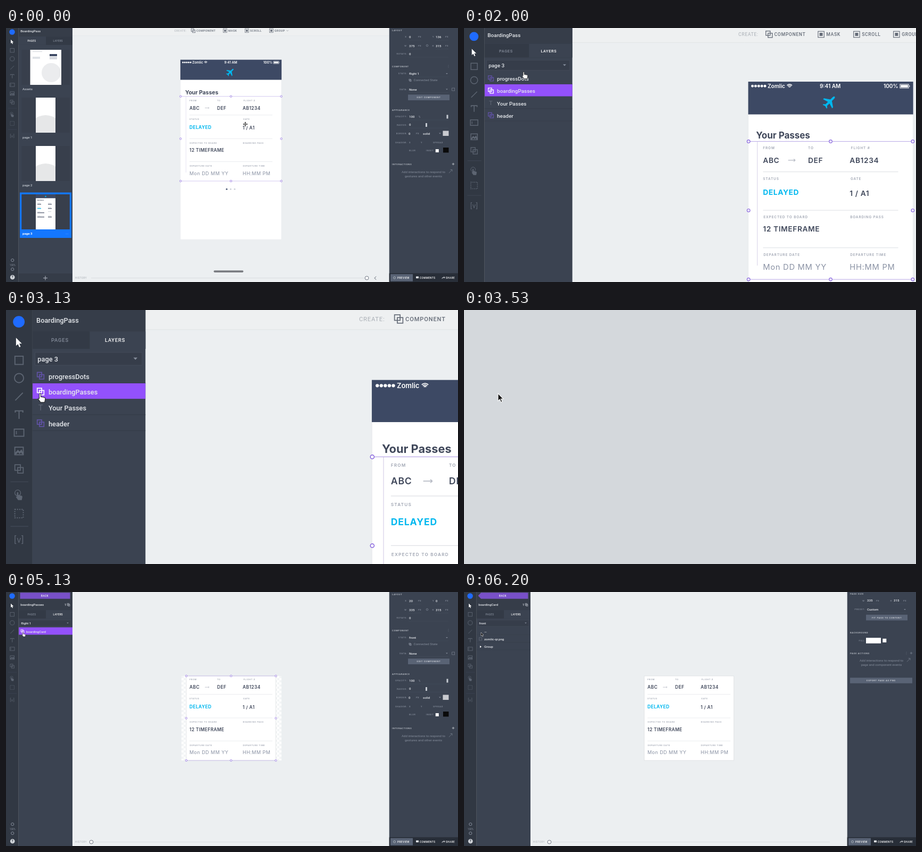
An HTML page with a canvas that plays this animation: 850 px wide and 478 px high, repeating every 7.67 s.

```html
<!DOCTYPE html>
<html lang="en">
<head>
<meta charset="utf-8">
<title>Design editor walkthrough</title>
<style>
html, body { margin: 0; width: 100%; height: 100%; overflow: hidden; background: #eceff1; }
canvas { display: block; width: 850px; height: 478px; }
</style>
</head>
<body>
<canvas id="stage" width="850" height="478"></canvas>
<script>
const c = document.getElementById('stage').getContext('2d');
const LOOP = 7670, UI = 'Roboto, sans-serif', PASS = 'Inter, sans-serif';
const PANEL = '#3b4351', DARK = '#313843', DIM = '#858d9b', LIGHT = '#e4e7eb', PURPLE = '#9351fc';
const ARROW = new Path2D('M0 0V6.7L1.6 5.3L2.7 7.9L3.8 7.4L2.7 4.9H4.8Z');
const HAND = new Path2D('M1 .8Q1 0 1.7 0T2.4 .8V3L5.6 3.6Q6.6 3.9 6.4 5L5.8 8H2.2L0 4.9Q.3 4 1 4.6Z');
const PLANE = new Path2D('M0-8Q1.2-8 1.2-5.5V-2.5L7 1.5V3L1.2 1.2V5L3 6.5V7.5L0 6.6L-3 7.5V6.5L-1.2 5V1.2L-7 3V1.5L-1.2-2.5V-5.5Q-1.2-8 0-8Z');

const ease = (t, a, b) => {
  const p = Math.min(1, Math.max(0, (t - a) / (b - a)));
  return p * p * (3 - 2 * p);
};

function box(x, y, w, h, fill, stroke, lw = .6) {
  if (fill) { c.fillStyle = fill; c.fillRect(x, y, w, h); }
  if (stroke) { c.strokeStyle = stroke; c.lineWidth = lw; c.strokeRect(x, y, w, h); }
}

function dot(x, y, r, fill, stroke, lw = .7) {
  c.beginPath();
  c.arc(x, y, r, 0, 7);
  if (fill) { c.fillStyle = fill; c.fill(); }
  if (stroke) { c.strokeStyle = stroke; c.lineWidth = lw; c.stroke(); }
}

function line(color, lw, ...p) {
  c.beginPath();
  for (let i = 0; i < p.length; i += 2) c.lineTo(p[i], p[i + 1]);
  c.strokeStyle = color;
  c.lineWidth = lw;
  c.stroke();
}

function shape(path, x, y, fill, stroke, scale = 1, turn = 0) {
  c.save();
  c.translate(x, y);
  c.rotate(turn);
  c.scale(scale, scale);
  c.fillStyle = fill;
  c.fill(path);
  if (stroke) { c.strokeStyle = stroke; c.lineWidth = .5; c.stroke(path); }
  c.restore();
}

// y is the middle of the capitals
function text(s, x, y, size = 6.1, color = LIGHT, weight = 500, gap = 0, align = 'left', font = UI) {
  c.font = `${weight} ${size}px ${font}`;
  c.letterSpacing = gap + 'px';
  c.textAlign = align;
  c.fillStyle = color;
  c.fillText(s, x, y + size * .36);
}

const caps = (s, x, y, color = '#c3c8d0', align = 'left', size = 4.3) =>
  text(s, x, y, size, color, 500, .6, align);
const caret = (x, y, color = DIM) => {
  c.beginPath();
  c.moveTo(x - 1.8, y - 1);
  c.lineTo(x + 1.8, y - 1);
  c.lineTo(x, y + 1);
  c.fillStyle = color;
  c.fill();
};
const plus = (x, y, r, color = DIM, w = .7) => {
  line(color, w, x - r, y, x + r, y);
  line(color, w, x, y - r, x, y + r);
};
const component = (x, y, color, s = 1) => {
  box(x - 3 * s, y - 3 * s, 4 * s, 4 * s, null, color, .8);
  box(x - s, y - s, 4 * s, 4 * s, null, color, .8);
};
const button = (x, y, w, h, s) => {
  box(x, y, w, h, '#596375');
  caps(s, x + w / 2, y + h / 2, '#d5d9df', 'center');
};

function toolbar() {
  box(0, -5, 23.8, 490, DARK);
  dot(11.5, 7.5, 5.2, '#1f6bff');
  shape(ARROW, 9, 21.8, '#fff', null, 1.08);
  const g = '#5d6572', x = 11.7;
  box(x - 3.7, 38.4, 7.4, 7.4, null, g, .9);
  dot(x, 58, 4.1, null, g, .9);
  line(g, .9, x - 3.4, 78, x + 3.4, 71.2);
  line(g, 1, x - 3.4, 89, x - 3.4, 87.4, x + 3.4, 87.4, x + 3.4, 89);
  line(g, 1, x, 87.4, x, 94.6);
  box(x - 4.3, 103.8, 8.6, 6.4, null, g, .9);
  line(g, .8, x - 2.4, 105.5, x - 2.4, 108.5);
  box(x - 3.8, 120, 7.6, 6.8, null, g, .9);
  line(g, 1.6, x - 3.4, 126, x - 1, 123.5, x + .5, 125, x + 2, 123.3, x + 3.4, 126);
  component(x, 139.5, g, 1.25);
  line('#434b58', .5, 4, 151, 20, 151);
  shape(HAND, x - 2.8, 160.3, g, null, .9);
  dot(x - 1.2, 161, 2.6, null, g, .6);
  c.setLineDash([1, 1]);
  box(x - 3.8, 175.8, 7.6, 7.6, null, g, .9);
  c.setLineDash([]);
  line('#434b58', .5, 4, 191, 20, 191);
  text('[v]', x, 203, 8, g, 400, .3, 'center');
  for (const y of [437, 454]) dot(x + .5, y, 2.6, null, DIM, 1);
  text('100%', x + .7, 446, 4.6, DIM, 400, 0, 'center');
  dot(x + .5, 469, 4.3, '#d3d7dc');
  text('?', x + .5, 469, 6.4, DARK, 700, 0, 'center');
}

function tabs(y, pagesOn) {
  box(23.8, y - 8, 101.2, 15.7, '#333a46');
  box(pagesOn ? 23.8 : 75, y - 8, pagesOn ? 51.2 : 50, 15.7, PANEL);
  text('PAGES', 40.5, y, 4.5, pagesOn ? '#fff' : DIM, 500, .4);
  text('LAYERS', 88.6, y, 4.5, pagesOn ? DIM : '#fff', 500, .4);
}

function pages() {
  tabs(24.1, true);
  const thumb = (y, x, w) => {
    box(29.3, y, 90.5, 66, '#383f4c');
    box(x, y, w, 66, '#fff');
  };
  const labels = [['Assets', 115, 41], ['page 1', 206, 131], ['page 2', 296, 222]];
  labels.forEach(([s, y, top], i) => {
    thumb(top, i ? 56 : 45.5, i ? 37 : 58.5);
    c.save();
    c.beginPath();
    c.rect(i ? 56 : 45.5, top, i ? 37 : 58.5, 66);
    c.clip();
    if (i) dot(74.5, top + 66, 33, '#e6e7e8');
    else {
      dot(85, 84, 18, '#ebecee');
      box(50, 44, 18, .8, '#c9ccd2');
      box(82, 49, 14, 4, '#3d4964');
      box(82, 54, 14, 5, '#d5d8de');
      box(50, 54, 14, 4, '#dfe2e7');
    }
    c.restore();
    text(s, 31, y, 6.1, '#c3c8d0');
  });
  box(26, 309.5, 97, 85.5, '#1477ff');
  thumb(313, 56, 37);
  box(56, 313, 37, 7.3, '#3d4964');
  dot(74.5, 317, 1.2, '#00b8ef');
  text('Your Passes', 58, 324.5, 2.2, '#3f475a', 700, 0, 'left', PASS);
  for (let i = 0; i < 4; i++) {
    const y = 329 + i * 8;
    box(59, y, 6, .8, '#c4c8d0');
    box(59, y + 2, i > 1 ? 13 : 7, 1.3, i == 1 ? '#00b8ef' : '#596175');
    box(79, y, 6, .8, '#c4c8d0');
    if (i != 2) box(79, y + 2, 7, 1.3, '#596175');
  }
  text('page 3', 31, 387, 6.1, '#fff', 700);
  text('···', 112, 387, 6, '#7db4ff');
  box(23.8, 462, 101.2, 20, '#353c48');
  plus(74, 470.5, 4, '#aab0ba', 1.1);
}

function layers(dy, page, rows, selected) {
  tabs(24.1 + dy, false);
  box(26, 35 + dy, 96, 11.5, '#363d4a', '#454d5b', .4);
  text(page, 28.3, 40.8 + dy);
  caret(116, 40.6 + dy);
  rows.forEach(([name, kind], i) => {
    const y = 56.5 + dy + i * 14.2, on = i == selected;
    if (on) box(23.8, y - 8, 101.2, 13.9, PURPLE);
    else line('#353c48', .5, 23.8, y + 6, 125, y + 6);
    if (kind == 'c') component(31, y - .6, on ? '#fff' : '#6152a6');
    if (kind == 't') text('T', 31, y - .6, 7, '#5f6775', 400, 0, 'center');
    if (kind == 'i') box(28.6, y - 2.8, 5, 5, null, '#6b7382');
    if (kind == 'g') shape(new Path2D('M0-2L3 0L0 2Z'), 30, y, '#fff');
    text(name, 38.1, y);
  });
}

function leftPanel(mode, t) {
  box(23.8, -5, 101.2, 490, PANEL);
  box(23.8, -5, 101.2, mode == 'page' ? 21 : 39, '#363d49');
  if (mode == 'page') {
    text('BoardingPass', 27.2, 6.2);
    if (t < 1070) pages();
    else layers(0, 'page 3', [['progressDots', 'c'], ['boardingPasses', 'c'], ['Your Passes', 't'], ['header', 'c']], 1);
    return;
  }
  const card = mode == 'card';
  shape(new Path2D(card ? 'M0 5.7L5.5 0H94V11.5H5.5Z' : 'M0 0H94V11.5H0Z'), 26.5, 1.2, '#7850c8');
  caps('BACK', 73, 7, '#fff', 'center', 4.6);
  text(card ? 'boardingCard' : 'boardingPasses', 27.2, 24);
  text('1', 110, 24);
  component(117.5, 24, '#aab0ba', .8);
  if (card) layers(18, 'front', t < 5930 ? [] : [['—'], ['zomlic-qr.png', 'i'], ['Group', 'g']]);
  else layers(18, 'flight 1', [['boardingCard', 'c']], t < 5130 ? -1 : 0);
}

function topBar() {
  box(125, -5, 596, 19.5, '#eef0f1');
  line('#dfe3e5', .5, 125, 14.6, 721, 14.6);
  text('CREATE:', 316.5, 5.1, 5.3, '#a9aeb5', 400, .4);
  const tools = [['COMPONENT', 358], ['MASK', 418], ['SCROLL', 459], ['GROUP', 505]];
  tools.forEach(([s, x], i) => {
    text(s, x, 5.1, 5.3, '#646b77', 500, .4);
    if (!i) return component(x - 6, 5, '#646b77', 1.25);
    box(x - 9.5, 1.6, 7, 7, null, '#646b77', .7);
    box(x - 7.8, 3.3, 3.6, 3.6, '#646b77');
  });
  line('#8b919b', .7, 527.5, 4.2, 529.3, 6, 531, 4.2);
}

function history(knob) {
  text('HISTORY', 130, 470.5, 4.6, '#a9aeb5', 400, .5);
  line('#dadde0', 1, 160, 470.5, knob > 200 ? 676 : 688, 470.5);
  dot(knob, 470.5, 3.4, '#fff', '#5d6573', .9);
  if (knob > 200) line('#4c5462', 1, 696, 467.6, 693, 470.6, 696, 473.6);
}

function pass(dy) {
  const tag = (s, x, y) => text(s, x, y + dy, 3.9, '#a0a6b3', 600, .58, 'left', PASS);
  const bold = (s, x, y, color = '#3f475a', weight = 600) =>
    text(s, x, y + dy, 8.4, color, weight, .4, 'left', PASS);
  const thin = (s, x, y) => text(s, x, y + dy, 9, '#8a92a4', 400, .45, 'left', PASS);
  tag('FROM', 345, 136.2); tag('TO', 397, 136.2); tag('FLIGHT #', 446.5, 136.2);
  bold('ABC', 345, 150.5); bold('DEF', 397, 150.5); bold('AB1234', 445, 150.5);
  line('#b5b9c3', .8, 374, 150.4 + dy, 382, 150.4 + dy);
  line('#b5b9c3', .8, 380.4, 148.9 + dy, 382, 150.4 + dy, 380.4, 151.9 + dy);
  tag('STATUS', 345, 171.6); tag('GATE', 446, 172);
  bold('DELAYED', 345, 187.2, '#00b8ef', 700); bold('1 / A1', 445, 188.4);
  tag('EXPECTED TO BOARD', 345.5, 216.2); tag('BOARDING PASS', 445.5, 216.2);
  bold('12 TIMEFRAME', 345, 230);
  tag('DEPARTURE DATE', 345.5, 259.8); tag('DEPARTURE TIME', 445.5, 259.8);
  thin('Mon DD MM YY', 345, 273.4); thin('HH:MM PM', 445, 273.4);
  for (const y of [163.8, 208.2, 251.5]) line('#d5d8de', .5, 345, y + dy, 501, y + dy);
}

function selection(x, y, w, h) {
  for (const edge of [y, y + h]) line('#b7a6e6', .6, x, edge, x + w, edge);
  for (let i = 0; i < 9; i++)
    if (i != 4) dot(x + i % 3 * w / 2, y + (i / 3 | 0) * h / 2, 1.7, '#fff', '#8460dc', .7);
}

function phone() {
  box(328, 60, 190, 338, '#fff', '#e4e7ea', .4);
  box(327.9, 59.7, 190.3, 37.8, '#3d4964');
  for (let i = 0; i < 5; i++) dot(332.8 + i * 3.6, 64.8, 1.5, '#fff');
  const bar = (s, x, align) => text(s, x, 64.8, 6.2, '#fff', 600, 0, align, PASS);
  bar('Zomlic', 350.3); bar('9:41 AM', 422.5, 'center'); bar('100%', 501, 'right');
  for (const r of [1.4, 2.8, 4.2]) {
    c.beginPath();
    c.arc(375.6, 67, r, -2.35, -.8);
    c.strokeStyle = '#fff';
    c.lineWidth = .9;
    c.stroke();
  }
  box(503, 62.7, 10, 4.4, null, '#fff', .6);
  box(503.8, 63.5, 8.4, 2.8, '#fff');
  box(513.6, 64.2, .8, 1.4, '#fff');
  shape(PLANE, 421.7, 83, '#00b8ef', null, 1.06, Math.PI / 4);
  text('Your Passes', 337, 121.5, 10.4, '#3f475a', 700, 0, 'left', PASS);
  line('#cfc8e4', .5, 338.4, 129, 338.4, 272);
  pass(0);
  for (let i = 0; i < 3; i++) dot(415 + i * 7.5, 303.3, 1.5, i ? '#cdd1d9' : '#4a5874');
  selection(328.3, 128.7, 189.4, 159.3);
}

function cardStage(mode, t) {
  if (mode == 'passes') {
    box(330, 158, 188, 159, '#f3f5f6');
    for (let i = 0; i < 47; i++)
      for (let j = 0; j < 40; j++)
        if ((i + j) % 2) box(330 + i * 4, 158 + j * 4, 4, j < 39 ? 4 : 3, '#fff');
  }
  box(339, 158, 168.5, 159, '#fff', '#d3d7db', .6);
  pass(28.8);
  if (mode == 'passes' && t >= 5130) selection(339, 158, 168.5, 159);
}

function field(label, value, y, drop) {
  caps(label, 754.5, y, DIM, 'right', 4.1);
  text(value, 758, y);
  line('#4b5362', .4, 757, y + 6, 832, y + 6);
  if (drop) caret(829, y);
}

function pair(y, a, av, b, bv) {
  caps(a, 753.5, y, DIM, 'right', 4.1); text(av, 758, y); caps('PX', 775, y, DIM, 'left', 4.1);
  caps(b, 805, y, DIM, 'right', 4.1); text(bv, 808, y); caps('PX', 826, y, DIM, 'left', 4.1);
  line('#4b5362', .4, 757, y + 6, 781, y + 6);
  line('#4b5362', .4, 808, y + 6, 832, y + 6);
}

function hint(y, second) {
  text('Add interactions to respond to', 785, y, 6.1, DIM, 400, 0, 'center');
  text(second, 785, y + 8, 6.1, DIM, 400, 0, 'center');
  line(DIM, .6, 833, y + 2, 838.5, y - 4);
  line(DIM, .6, 835.5, y - 4.5, 839, y - 4.5, 839, y - 1);
}

function layerProps(x, y, w, state) {
  caps('LAYOUT', 726, 4);
  pair(17, 'X', x, 'Y', y);
  pair(33.5, 'W', w, 'H', '315');
  dot(792, 33, 1.8, null, DIM);
  field('ROTATE:', '0', 49);
  caps('COMPONENT', 726, 72);
  text('⋮', 829, 72, 6, DIM);
  field('STATE:', state, 86, true);
  component(760, 98.3, DIM, .7);
  text('Connected State', 766.5, 98.3, 6.1, DIM, 400);
  field('DATA:', 'None', 115.5, true);
  box(838.7, 113, 5, 5, null, DIM);
  button(756, 125.3, 78, 10.7, 'EDIT COMPONENT');
  caps('APPEARANCE', 726, 154);
  field('OPACITY:', '100', 167);
  text('%', 776, 167, 4.5, DIM);
  box(828.5, 163.5, 3, 7, '#c5cad2');
  field('RADIUS:', '0', 182.3);
  box(789, 179, 3, 7, '#c5cad2');
  caps('BORDER:', 754.5, 198.7, DIM, 'right', 4.1);
  text('0', 757, 198.7);
  caps('PX', 771, 198.7, DIM, 'left', 4.1);
  text('solid', 784, 198.7);
  caret(816, 198.5);
  box(821.5, 193.5, 11, 9.5, '#c9cacf');
  caps('SHADOW:', 754.5, 215.7, DIM, 'right', 4.1);
  [['X', 758, 215.7], ['Y', 780, 215.7], ['SPREAD', 803, 215.7], ['BLUR', 758, 231], ['INSET', 790, 231]]
    .forEach(([s, px, py]) => caps(s, px, py, DIM, 'left', 4.1));
  box(807.8, 228, 6, 6, '#fff');
  box(822, 225, 10.5, 9.5, '#0a0a0a');
  caps('INTERACTIONS', 726, 256);
  plus(841, 256, 2.3, LIGHT);
  hint(271, 'gestures and other events');
}

function timer(y) {
  dot(730, y, 3.6, null, LIGHT, .9);
  line(LIGHT, .7, 730, y - 2, 730, y, 731.8, y);
  text('Timer', 738, y);
  box(839.2, y - 1.8, 3.8, 4.2, null, DIM);
  line(DIM, .7, 838.4, y - 2.6, 843.8, y - 2.6);
  field('WAIT', '0', y + 15);
  caps('SEC', 833, y + 15, DIM, 'right', 4.1);
  plus(791, y + 27, 1.8);
  field('SET', 'Select action...', y + 37, true);
  text('{v}', 837, y + 37, 5.4, DIM);
  field('TO', 'Value...', y + 52.7, true);
  field('VALUE', '1', y + 68.7);
}

function pageProps(card) {
  caps('PAGE SIZE', 726, 3.7);
  pair(16.3, 'W', card ? '335' : '375', 'H', '315');
  field('PRESET:', 'Custom', 33, true);
  button(756, 42.7, 78, 10.7, 'FIT PAGE TO CONTENT');
  caps('BACKGROUND', 726, 76.3);
  caps('FILL:', 754.5, 91.3, DIM, 'right', 4.1);
  box(756, 86.2, 28, 10.5, '#fff');
  box(787.3, 87.8, 7, 7, '#fff');
  caps('PAGE ACTIONS', 726, 115);
  text('⋮', 829, 115, 6, DIM);
  plus(841, 115, 2.3, DIM);
  if (card) hint(129.3, 'page and component events');
  else [128.3, 228].forEach(timer);
  button(726, card ? 161.3 : 327.5, 117, 10.5, 'EXPORT PAGE AS PNG');
}

function rightPanel(mode, t) {
  box(720.7, -5, 130, 490, PANEL);
  if (mode == 'page') layerProps('0', '136', '375', 'flight 1');
  else if (mode == 'passes' && t >= 5130) layerProps('20', '0', '335', 'front');
  else pageProps(mode == 'card');
  box(720.7, 461.5, 130, 20, '#282e38');
  box(723, 463.2, 42, 13.5, '#596375');
  [['PREVIEW', 736], ['COMMENTS', 778], ['SHARE', 827]]
    .forEach(([s, x]) => text(s, x, 470, 4.6, '#fff', 500, .5));
  dot(730.5, 470, 2, null, '#c5cad2');
  box(771, 467.5, 5, 3.6, '#e4e7eb');
  line('#e4e7eb', .9, 820, 472, 821, 469.5, 825, 469.5);
  line('#e4e7eb', .9, 823.3, 467.6, 825, 469.5, 823.3, 471.4);
}

const moves = [[70, 450, 181], [930, 115, 25], [1600, 115, 25], [2330, 34.5, 65.7], [2400, 34.5, 65.7],
  [2800, 30.5, 71.8], [4470, 30.5, 71.8], [4670, 32, 76]];

function cursor(t, mode) {
  let [, x, y] = moves[0];
  for (let i = 1; i < moves.length; i++) {
    const p = ease(t, moves[i - 1][0], moves[i][0]);
    x += (moves[i][1] - moves[i - 1][1]) * p;
    y += (moves[i][2] - moves[i - 1][2]) * p;
  }
  if (x > 328) {
    for (const [color, w] of [['#fff', 2], ['#222', 1]]) plus(x, y, 3.6, color, w);
    for (let i = 0; i < 4; i++)
      shape(new Path2D('M0-4.4L1.6-2.6H-1.6Z'), x, y, '#222', null, 1, i * Math.PI / 2);
  } else if (x < 125 && (mode == 'page' || mode == 'passes')) shape(HAND, x - 1.7, y, '#fff', '#222');
  else shape(ARROW, x, y, '#111', '#fff');
}

function draw(t) {
  const mode = t < 3530 ? 'page' : t < 3670 ? 'load' : t < 5730 ? 'passes' : t < 5870 ? 'load' : 'card';
  const zoom = ease(t, 1600, 2330) - ease(t, 3600, 4270), s = 1 + 1.098 * zoom;
  c.setTransform(s, 0, 0, s, 0, 6.4 * zoom);
  if (mode == 'load') {
    box(0, -5, 850, 490, '#d4d8dc');
    if (t >= 5730) {
      box(0, 0, 1, 478, '#a2a5a8');
      box(849, 0, 1, 478, '#a2a5a8');
      if (t >= 5800) dot(423, 236, 7, '#e9ebed');
    }
  } else {
    box(0, -5, 850, 490, '#eceff1');
    if (mode == 'page') {
      topBar();
      phone();
      c.beginPath();
      c.roundRect(390.5, 456.3, 56, 3.6, 1.8);
      c.fillStyle = '#7b7d82';
      c.fill();
      history(678.5);
    } else {
      if (mode == 'passes' || t >= 5930) cardStage(mode, t);
      if (mode == 'passes' ? t >= 4670 : t >= 6200) history(160.5);
    }
    leftPanel(mode, t);
    toolbar();
    rightPanel(mode, t);
  }
  cursor(t, mode);
}

const start = performance.now();
(function tick() {
  draw((performance.now() - start) % LOOP);
  requestAnimationFrame(tick);
})();
</script>
</body>
</html>
```
